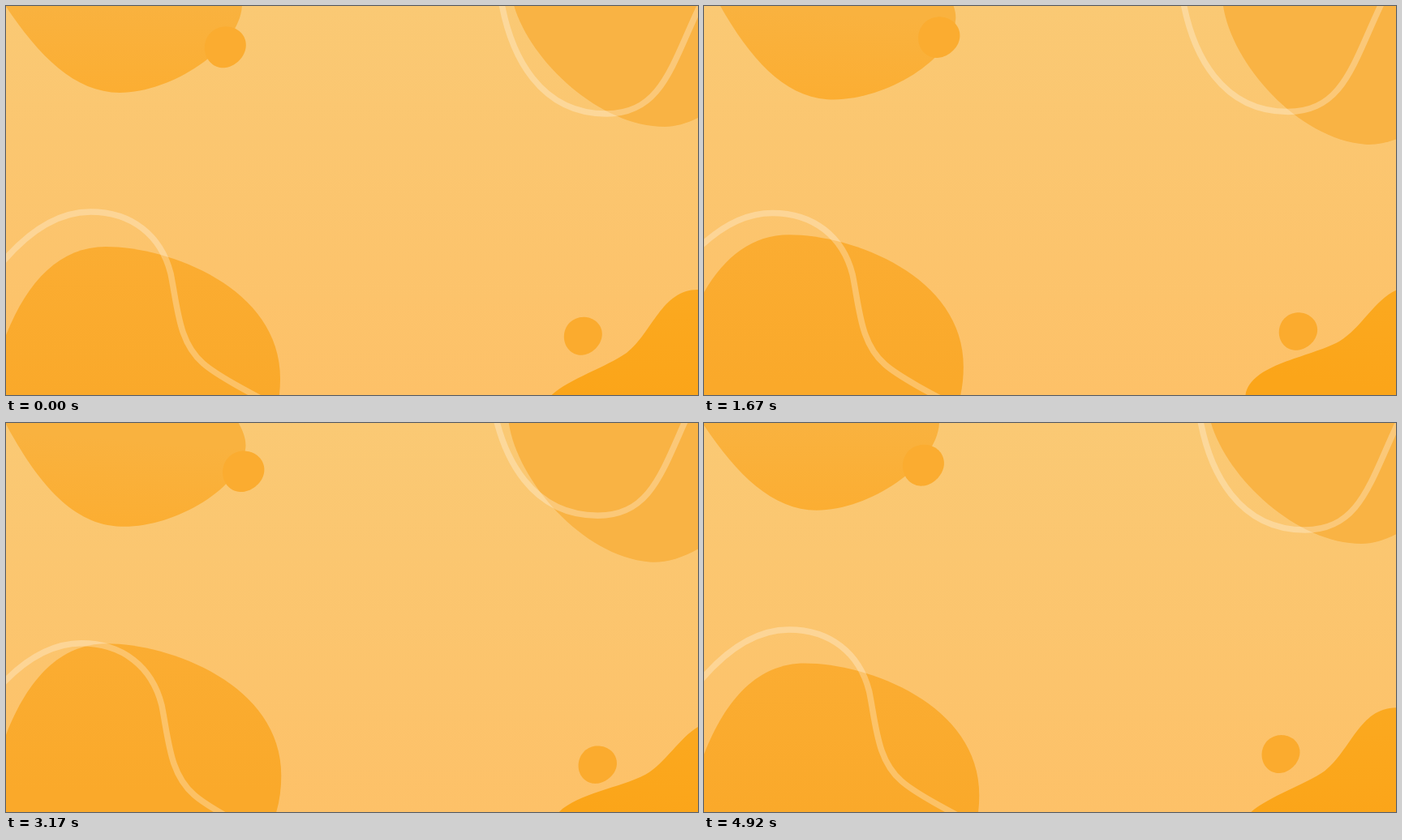
An HTML page with a canvas for the animation above (5010 ms loop, 853 by 480 pixels).

```html
<!DOCTYPE html>
<html lang="en">
<head>
<meta charset="utf-8">
<title>Drifting blobs</title>
<style>
  html, body { margin: 0; width: 100%; height: 100%; overflow: hidden; background: #fbc56e; }
  canvas { display: block; width: 853px; height: 480px; }
</style>
</head>
<body>
<canvas id="stage" width="853" height="480"></canvas>
<script>
const W = 853, H = 480, LOOP = 5010, STEPS = 60;
const ctx = document.getElementById('stage').getContext('2d');
const rad = deg => deg * Math.PI / 180;

function gradient(y0, top, y1, bottom) {
  const g = ctx.createLinearGradient(0, y0, 0, y1);
  g.addColorStop(0, top);
  g.addColorStop(1, bottom);
  return g;
}

// Slightly lopsided round drop
function drop(cx, cy, size) {
  const path = new Path2D();
  for (let deg = 0; deg < 360; deg += 4) {
    const a = rad(deg);
    const r = size * (1 - 0.035 * Math.sin(2 * a) + 0.015 * Math.cos(3 * a + rad(45)));
    path.lineTo(cx + r * Math.cos(a), cy + r * Math.sin(a));
  }
  path.closePath();
  return path;
}

// Every shape drifts on a circle (radius, start angle, direction)
// and swings around its pivot by `sway` degrees to either side.
const shapes = [
  {
    fill: gradient(0, '#f9b23f', 125, '#fcad30'),
    radius: 12, start: -124, sway: 2.7, pivot: [150, 10],
    path: new Path2D(`M-22 -34 C25 44 75 107 140 107 S291 50 291 -3
                      C291 -25 265 -55 235 -75 Z`)
  },
  {
    fill: '#f9b344',
    radius: 13, start: -86, sway: 3, pivot: [790, 60],
    path: new Path2D(`M622 -22 C628 50 723 149 812 149 C850 149 900 115 930 60
                      V-90 H650 Z`)
  },
  {
    fill: gradient(280, '#fbad33', 480, '#faa92a'),
    radius: 13.5, start: 69,
    path: new Path2D(`M-30 520 C-8 388 40 297 123 297 C200 297 338 347 338 460
                      C338 500 325 540 290 570 Z`)
  },
  {
    fill: gradient(345, '#fba920', 480, '#fba519'),
    radius: 12.8, start: 172, sway: 4.5, pivot: [770, 434],
    path: new Path2D(`M658 512 C654 470 728 454 765 428 C797 403 808 350 853 350
                      S930 400 930 440 V600 H700 Z`)
  },
  {
    fill: '#fbac30',
    radius: 13.2, start: 178, sway: 4, pivot: [270, 50.5],
    path: drop(270, 50.5, 25.4)
  },
  {
    fill: '#fbab2e',
    radius: 12.6, start: 195, sway: 5, pivot: [711, 407],
    path: drop(711, 407, 23.4)
  },
  {
    radius: 11.8, start: 37,
    path: new Path2D('M607 -30 C618 70 664 133 740 133 S822 60 870 -30')
  },
  {
    radius: 11.5, start: -34, dir: -1,
    path: new Path2D(`M-30 350 C4 300 50 254 104 254 C155 254 191 283 203 330
                      C212 375 213 415 243 441 C260 456 300 477 340 498`)
  }
];

const backdrop = gradient(0, '#fac974', H, '#fdc168');

function draw(phase) {
  ctx.fillStyle = backdrop;
  ctx.fillRect(0, 0, W, H);
  ctx.strokeStyle = 'rgba(255,255,255,0.28)';
  ctx.lineWidth = 7.5;
  for (const { fill, radius, start, dir = 1, sway = 0, pivot = [0, 0], path } of shapes) {
    const from = rad(start), to = from + dir * phase;
    const [px, py] = pivot;
    ctx.save();
    ctx.translate(px + radius * (Math.cos(to) - Math.cos(from)),
                  py + radius * (Math.sin(to) - Math.sin(from)));
    ctx.rotate(rad(sway) * (1 - Math.cos(phase)));
    ctx.translate(-px, -py);
    if (fill) {
      ctx.fillStyle = fill;
      ctx.fill(path);
    } else {
      ctx.stroke(path);
    }
    ctx.restore();
  }
}

// Twelve pictures per second, held between steps
const begin = performance.now();
function tick() {
  const t = (performance.now() - begin) % LOOP;
  const step = Math.min(STEPS - 1, Math.floor((t + 5) * 12 / 1000));
  draw(step / STEPS * 2 * Math.PI);
  requestAnimationFrame(tick);
}
tick();
</script>
</body>
</html>
```
